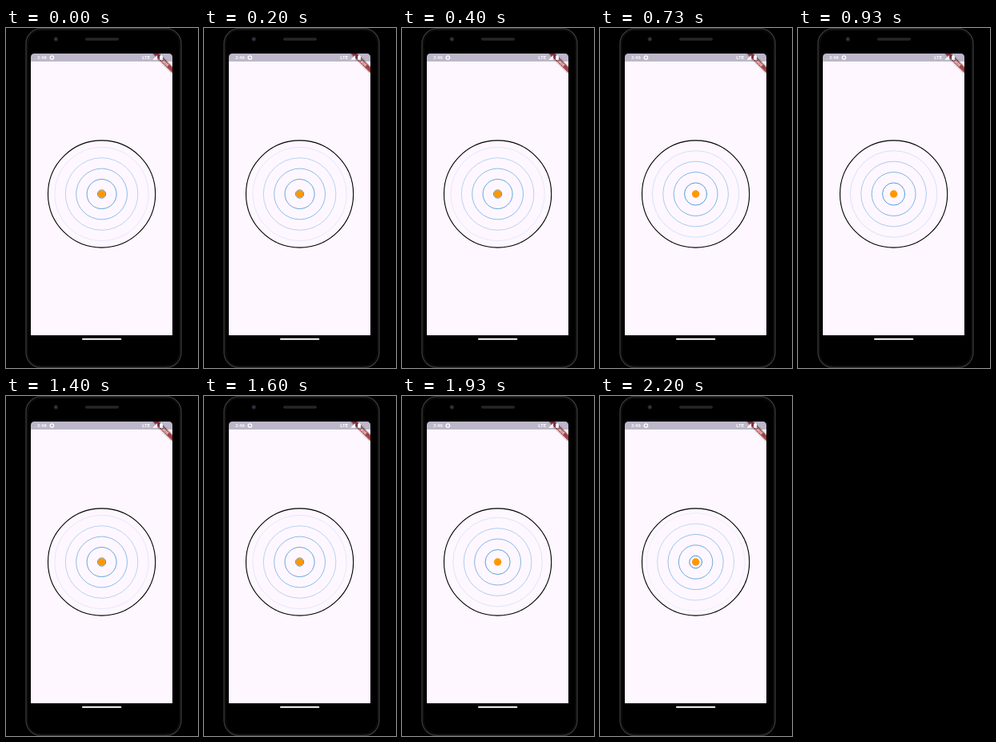
Recreate the animation shown at these times as an HTML page. Size 240x426 px, loop 2270 ms.

```html
<!DOCTYPE html>
<html lang="en">
<head>
<meta charset="utf-8">
<title>Ripple</title>
<style>
  html, body { margin: 0; height: 100%; overflow: hidden; background: #000; }
  svg { display: block; width: 100%; height: 100%; }
  text { font-family: Roboto, sans-serif; fill: #fff; }
</style>
</head>
<body>
<svg viewBox="0 0 240 426">
  <defs>
    <clipPath id="screen"><path d="M31 385V37q0-5 5-5H203q5 0 5 5V385z"/></clipPath>
    <filter id="blur" x="-20%" y="-80%" width="140%" height="260%"><feGaussianBlur stdDeviation="1.2"/></filter>
  </defs>

  <!-- Phone body -->
  <rect x="25" y=".7" width="194" height="424.8" rx="19" fill="#000" stroke="#3b3b3a" stroke-width="1.3"/>
  <rect x="26.8" y="2.4" width="190.4" height="421.4" rx="17.5" fill="none" stroke="#1c1c1c" stroke-width=".8"/>
  <circle cx="62.3" cy="14" r="2.7" fill="#202329"/>
  <circle cx="62.3" cy="14" r="1.2" fill="#34405a"/>
  <rect x="99" y="12.3" width="42" height="3.4" rx="1.7" fill="#262626"/>

  <!-- Screen -->
  <g clip-path="url(#screen)">
    <rect x="31" y="32" width="177" height="353" fill="#fef7ff"/>
    <g transform="translate(208 32) rotate(45)">
      <rect x="-17.2" y="12" width="34.4" height="5.2" fill="#000" opacity=".5" filter="url(#blur)"/>
      <rect x="-17.2" y="12" width="34.4" height="5.2" fill="#b71c1c" opacity=".63"/>
      <text y="16.2" font-size="4.4" font-weight="900" text-anchor="middle">DEBUG</text>
    </g>
    <rect x="31" y="32" width="177" height="10" fill="#000030" opacity=".26"/>
    <text x="39" y="39.2" font-size="6" font-weight="500">3:46</text>
    <circle cx="57.4" cy="37" r="2.2" fill="none" stroke="#fff" stroke-width="1.3"/>
    <text x="170.3" y="39.2" font-size="6" font-weight="700">LTE</text>
    <path d="M183.3 39.7h5.8v-5.8zM192.2 34.8h1v-.8h1.7v.8h1v5h-3.7z" fill="#fff"/>
  </g>
  <rect x="95" y="388.7" width="49.3" height="2" rx="1" fill="#fff"/>

  <!-- Ripple -->
  <g transform="translate(119.6 208)" fill="none">
    <g id="rings" stroke="#2b87cf"></g>
    <circle r="67.1" stroke="#000" stroke-width="1.1"/>
    <circle r="4.7" fill="#ff9800"/>
  </g>
</svg>
<script>
  const LOOP = 2270, FPS = 15, REACH = 67, COUNT = 5;
  const GAP = REACH / COUNT;
  const group = document.getElementById('rings');
  const rings = Array.from({ length: COUNT }, () =>
    group.appendChild(document.createElementNS('http://www.w3.org/2000/svg', 'circle')));

  function draw(ms) {
    const step = Math.floor((ms % LOOP + 4) * FPS / 1000);
    // One gap every three steps, slightly faster near the end of the loop
    const travel = 5.1 + step * GAP / 3 + Math.max(0, step - 24) * 0.3;
    rings.forEach((ring, i) => {
      const r = travel % GAP + i * GAP;
      ring.setAttribute('r', r);
      ring.setAttribute('opacity', 1 - r / REACH);
    });
  }

  const start = performance.now();
  function tick() {
    draw(performance.now() - start);
    requestAnimationFrame(tick);
  }
  tick();
</script>
</body>
</html>
```
